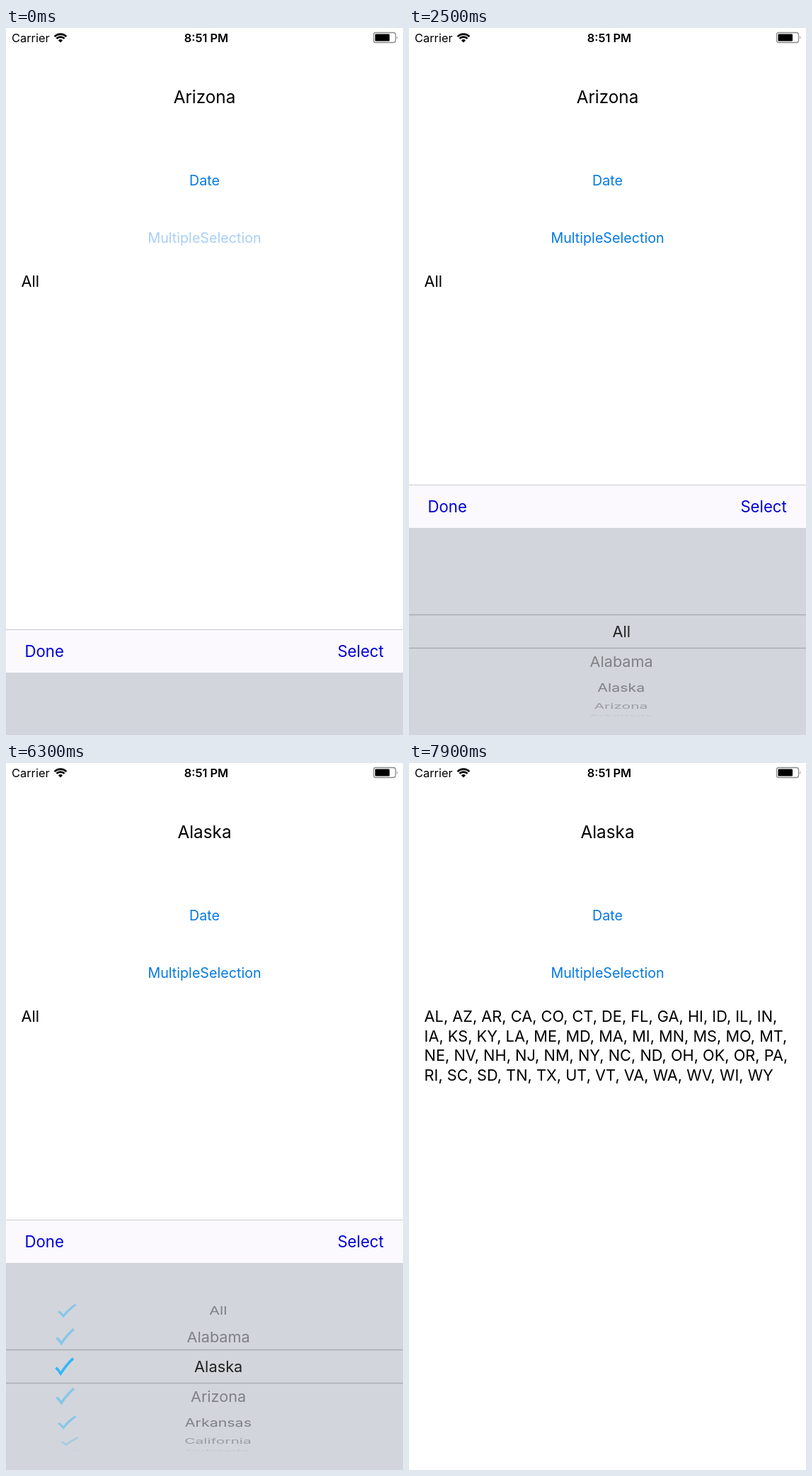
An HTML page that plays this animation: 561 px wide and 997 px high, repeating every 8 s.

```html
<!DOCTYPE html>
<html lang="en">
<head>
<meta charset="utf-8">
<title>Multiple selection picker</title>
<style>
  html, body { margin: 0; width: 100%; height: 100%; overflow: hidden; background: #fff; }
  svg { display: block; width: 100%; height: 100%; font-family: Inter, Roboto, sans-serif; }
  .mid { text-anchor: middle; }
  .status { font-size: 16.4px; }
  .title { font-size: 24.3px; }
  .link { font-size: 19.7px; fill: #0579e2; }
  .list { font-size: 21.75px; }
  .bar { font-size: 22.2px; fill: #0000d4; }
  .row { font-size: 21.8px; fill: #222; }
  .tick { fill: none; stroke: #32b7f6; stroke-width: 3.6; }
</style>
</head>
<body>
<svg viewBox="0 0 561 997">
  <defs>
    <clipPath id="outside"><path d="M0 705H561V827H0Z M0 875H561V970.5H0Z"/></clipPath>
    <clipPath id="inside"><path d="M0 828H561V874H0Z"/></clipPath>
  </defs>

  <g class="status">
    <text x="8" y="20">Carrier</text>
    <text class="mid" x="283" y="20" font-weight="600">8:51 PM</text>
    <path d="M77 20.5L73.9 17.4A4.4 4.4 0 0 1 80.1 17.4Z"/>
    <g fill="none" stroke="#000" stroke-width="2.7">
      <path d="M71.4 14.9A7.9 7.9 0 0 1 82.6 14.9M68.6 12.1A11.9 11.9 0 0 1 85.4 12.1"/>
    </g>
    <rect x="519.5" y="6.5" width="31" height="14" rx="3" fill="none" stroke="#8a8a8a" stroke-width="1.3"/>
    <rect x="521.5" y="8.5" width="20.5" height="10" rx="1.2"/>
    <path d="M552.3 11.2Q554.6 13.5 552.3 15.8Z" fill="#8a8a8a"/>
  </g>

  <text id="title" class="title mid" x="280.5" y="105.5"></text>
  <text class="link mid" x="280.5" y="221.5">Date</text>
  <text id="multi" class="link mid" x="280.5" y="302.8">MultipleSelection</text>
  <text id="all" class="list" x="21.6" y="365">All</text>
  <g id="codes" class="list"></g>

  <g id="sheet">
    <rect y="644" width="561" height="61" fill="#fbf9fd"/>
    <rect y="644" width="561" height="1" fill="#cbcace"/>
    <rect y="705" width="561" height="292" fill="#d2d5dc"/>
    <text id="done" class="bar" x="26.5" y="683">Done</text>
    <text id="select" class="bar" x="533.8" y="683" text-anchor="end">Select</text>
    <g id="dim" clip-path="url(#outside)" opacity=".47"></g>
    <g id="lit" clip-path="url(#inside)"></g>
    <path d="M0 827.5H561M0 874.5H561" stroke="#aaadb5" stroke-width="1.5"/>
  </g>
</svg>

<script>
const LOOP = 8000, STEP = 100;
const MID_X = 280.5, MID_Y = 851.1, RADIUS = 120, ROW_ANGLE = 20.5 * Math.PI / 180;
const names = ['All', 'Alabama', 'Alaska', 'Arizona', 'Arkansas', 'California', 'Colorado'];
const codeLines = [
  'AL, AZ, AR, CA, CO, CT, DE, FL, GA, HI, ID, IL, IN,',
  'IA, KS, KY, LA, ME, MD, MA, MI, MN, MS, MO, MT,',
  'NE, NV, NH, NJ, NM, NY, NC, ND, OH, OK, OR, PA,',
  'RI, SC, SD, TN, TX, UT, VT, VA, WA, WV, WI, WY'
];

const byId = id => document.getElementById(id);
const [title, multi, all, codes, sheet, done, select] =
  ['title', 'multi', 'all', 'codes', 'sheet', 'done', 'select'].map(byId);

function add(parent, tag, attrs, text = '') {
  const node = document.createElementNS(parent.namespaceURI, tag);
  for (const key in attrs) node.setAttribute(key, attrs[key]);
  node.textContent = text;
  return parent.appendChild(node);
}

codeLines.forEach((line, i) => add(codes, 'text', { x: 21.6, y: 365 + 27.5 * i }, line));

// Each wheel row exists twice: dimmed outside the selection band, full inside it.
const rows = ['dim', 'lit'].flatMap(layer => names.map((name, index) => {
  const node = add(byId(layer), 'g', {});
  add(node, 'text', { class: 'row mid', x: 19.7, y: 8 }, name);
  const tick = add(node, 'path', { class: 'tick', d: 'M-210 1.5Q-206 5-203.2 10Q-195-3-185.5-11.5' });
  return { node, tick, index };
}));

const clamp = x => Math.min(1, Math.max(0, x));
const smooth = x => x * x * (3 - 2 * x);
const decay = ms => Math.exp(-ms / 90);

// Opacity of a button that dims on touch and fades back on release.
const pressed = (t, down, up) => t < down ? 1 : 0.2 + 0.8 * smooth(clamp((t - up) / 500));

function sheetOffset(t) {
  if (t < 600) return 204 * decay(t);
  if (t < 7400) return 0;
  return t < 7900 ? 353 * (1 - decay(t - 7400)) : 400;
}

function isTicked(index, t) {
  if (t < 2500) return true;
  if (t < 4900) return false;
  return t < 6500 || (index !== 0 && index !== 2);
}

function placeRow({ node, tick, index }, scroll, t) {
  const angle = (index - scroll) * ROW_ANGLE;
  const flat = Math.cos(angle);
  const visible = Math.abs(angle) < Math.PI / 2;
  node.style.display = visible ? '' : 'none';
  if (!visible) return;
  const depth = 1 / (1 + 0.075 * (1 - flat));
  const y = MID_Y + RADIUS * Math.sin(angle);
  node.setAttribute('transform', `translate(${MID_X} ${y}) scale(${depth} ${flat})`);
  node.style.opacity = clamp(1.4 * flat);
  tick.style.display = isTicked(index, t) ? '' : 'none';
}

function render(t) {
  title.textContent = t < 5700 ? 'Arizona' : 'Alaska';
  multi.style.opacity = 0.35 + 0.65 * clamp(t / 600);
  all.style.display = t < 7400 ? '' : 'none';
  codes.style.display = t < 7400 ? 'none' : '';
  done.style.opacity = pressed(t, 7300, 7400);
  select.style.opacity = t < 6000 ? pressed(t, 4800, 4900) : pressed(t, 6400, 6500);
  sheet.setAttribute('transform', `translate(0 ${sheetOffset(t)})`);
  const scroll = 2 * smooth(clamp((t - 5000) / 750));
  rows.forEach(row => placeRow(row, scroll, t));
}

const start = performance.now();
function frame() {
  const t = (performance.now() - start) % LOOP;
  render(Math.floor(t / STEP) * STEP);
  requestAnimationFrame(frame);
}
frame();
</script>
</body>
</html>
```
